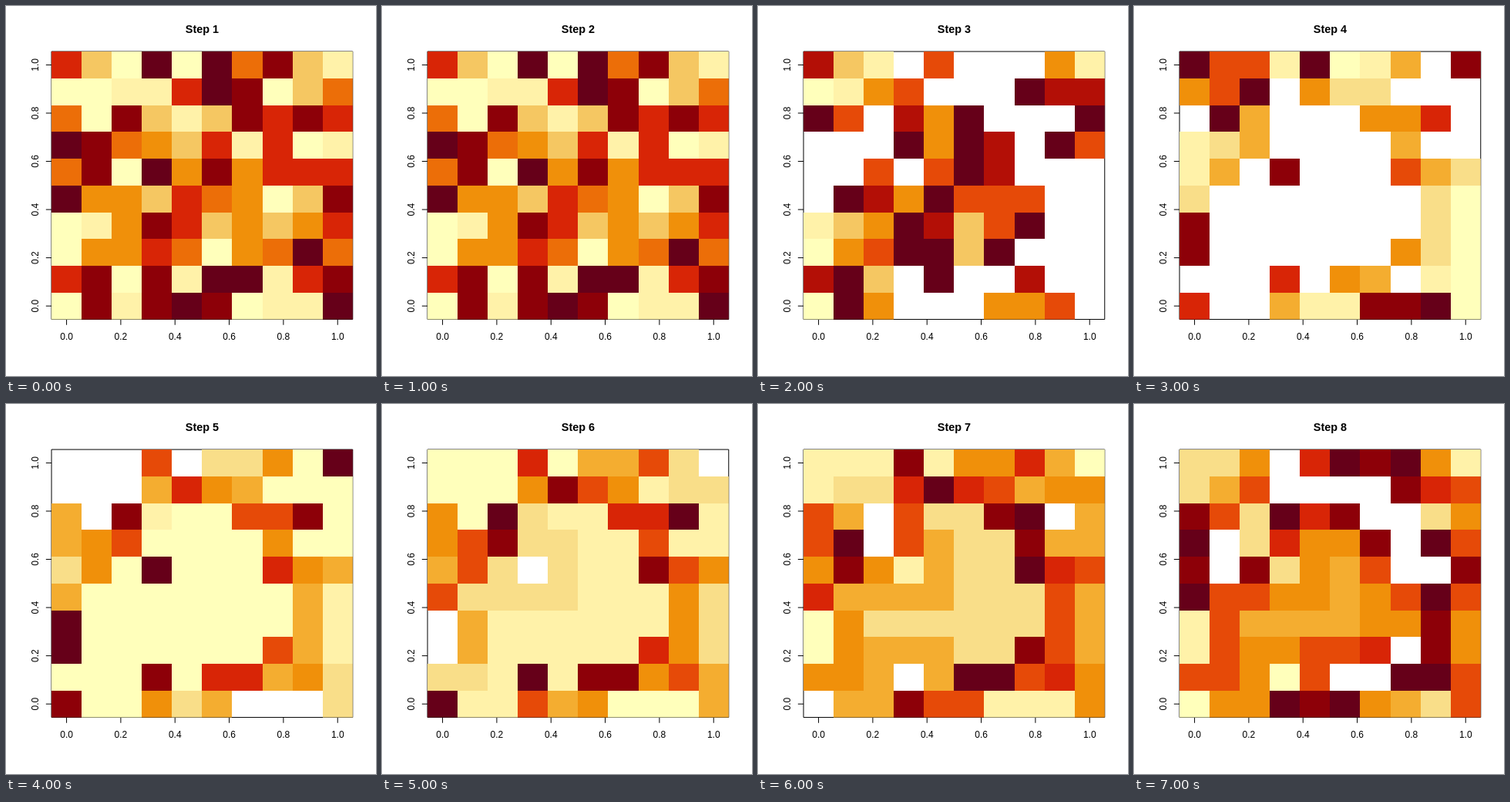
Animation, 480 px wide and 480 px high, one loop 8000 ms. Source, as an HTML page:

```html
<!DOCTYPE html>
<html lang="en">
<head>
<meta charset="utf-8">
<title>Energy grid</title>
<style>
  html, body { margin: 0; width: 100%; height: 100%; overflow: hidden; background: #fff; }
  svg { display: block; width: 480px; height: 480px; }
  text { font: 12px "Liberation Sans", Arial, sans-serif; text-anchor: middle; }
  #title { font-size: 14.4px; font-weight: bold; }
  #axes { fill: none; stroke: #000; stroke-width: 1; }
</style>
</head>
<body>
<svg viewBox="0 0 480 480">
  <path id="axes"/>
  <g id="cells"></g>
  <g id="labels"></g>
  <text id="title" x="254.4" y="35"></text>
</svg>
<script>
const SIZE = 10, STEPS = 8, STEP_MS = 1000;
const LEFT = 59.04, TOP = 59.04, RIGHT = 449.76, BOTTOM = 406.56;
const COLORS = ['#ffffbb', '#fff2a9', '#f9de89', '#f5c762', '#f4ad30', '#f0900a',
  '#ec6e08', '#e64a08', '#d82506', '#b30f06', '#8d0008', '#660019'];
const START = ['6318185732', '1122687135', '5173237676', '8754362612', '5718474666',
  '8443654137', '1247634346', '1446514585', '6717288267', '1727871228'];

const byId = id => document.getElementById(id);
function add(parent, name, attrs) {
  const el = document.createElementNS('http://www.w3.org/2000/svg', name);
  for (const key in attrs) el.setAttribute(key, attrs[key]);
  return parent.appendChild(el);
}

// Every cell gains 1; a cell above 9 flashes once, feeds its neighbours and drops to 0.
function advance(grid) {
  const next = grid.map(v => v + 1), flashed = new Set();
  const queue = [...next.keys()].filter(i => next[i] > 9);
  while (queue.length) {
    const i = queue.pop();
    if (flashed.has(i)) continue;
    flashed.add(i);
    const row = Math.floor(i / SIZE), col = i % SIZE;
    for (let r = Math.max(0, row - 1); r <= Math.min(SIZE - 1, row + 1); r++)
      for (let c = Math.max(0, col - 1); c <= Math.min(SIZE - 1, col + 1); c++) {
        const n = r * SIZE + c;
        if (n !== i && ++next[n] > 9) queue.push(n);
      }
  }
  return next.map(v => v > 9 ? 0 : v);
}

// Colours span the range of the non-zero values; zeros stay empty.
function shade(grid) {
  const live = grid.filter(v => v);
  const low = Math.min(...live), span = Math.max(...live) - low;
  return grid.map(v => v ? COLORS[Math.floor((v - low) / span * (COLORS.length - 1e-5))] : 'none');
}

const frames = [];
let grid = [...START.join('')].map(Number);
for (let s = 0; s < STEPS; s++) {
  frames.push(shade(grid));
  grid = advance(grid);
}

// Inner edges sit on whole pixels, outer edges on the box line.
const edges = (from, to) => Array.from({ length: SIZE + 1 }, (_, k) => {
  const p = from + (to - from) * k / SIZE;
  return k % SIZE ? Math.round(p) : p;
});
const xs = edges(LEFT, RIGHT), ys = edges(TOP, BOTTOM);
const cells = frames[0].map((_, i) => {
  const r = Math.floor(i / SIZE), c = i % SIZE;
  return add(byId('cells'), 'rect',
    { x: xs[c], y: ys[r], width: xs[c + 1] - xs[c], height: ys[r + 1] - ys[r] });
});

let path = `M${LEFT} ${TOP}H${RIGHT}V${BOTTOM}H${LEFT}Z`;
for (let k = 0; k <= 5; k++) {
  const part = (k / 5 + 1 / 18) * 0.9, label = (k / 5).toFixed(1);
  const x = LEFT + part * (RIGHT - LEFT), y = BOTTOM - part * (BOTTOM - TOP);
  path += `M${x} ${BOTTOM}v7.2M${LEFT} ${y}h-7.2`;
  add(byId('labels'), 'text', { x, y: 432.6 }).textContent = label;
  add(byId('labels'), 'text', { transform: `translate(41.8 ${y}) rotate(-90)` }).textContent = label;
}
byId('axes').setAttribute('d', path);

let shown = -1;
function draw(now) {
  const step = Math.floor(now / STEP_MS) % STEPS;
  if (step !== shown) {
    shown = step;
    byId('title').textContent = `Step ${step + 1}`;
    cells.forEach((cell, i) => cell.setAttribute('fill', frames[step][i]));
  }
}
const start = performance.now();
function tick() {
  draw(performance.now() - start);
  requestAnimationFrame(tick);
}
tick();
</script>
</body>
</html>
```
